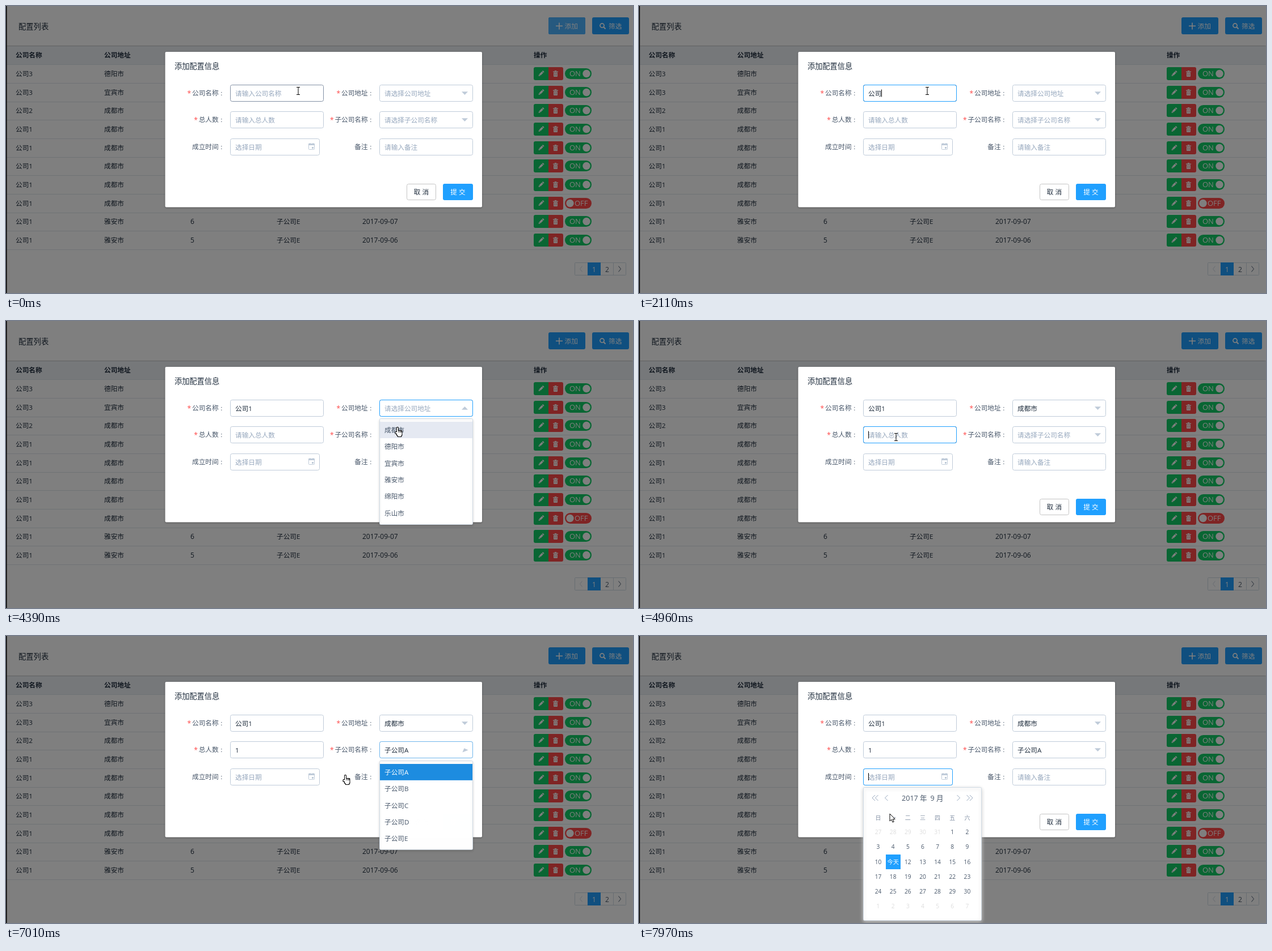
An HTML page with a canvas that plays this animation: 1105 px wide and 507 px high, repeating every 8 s.

```html
<!DOCTYPE html>
<html lang="zh-CN">
<head>
<meta charset="utf-8">
<title>配置列表</title>
<style>
html, body { margin: 0; width: 100%; height: 100%; overflow: hidden; background: #808080; }
canvas { display: block; width: 1105px; height: 507px; }
</style>
</head>
<body>
<canvas id="stage" width="1105" height="507"></canvas>
<script>
const c = document.getElementById('stage').getContext('2d');
const FONT = '"Open Sans", "Noto Sans CJK SC", "Noto Sans CJK", sans-serif';
const BLUE = '#20a0ff', GREEN = '#13ce66', RED = '#ff4949';
const INK = '#1f2d3d', LABEL = '#48576a', HINT = '#97a8be', LINE = '#bfcbd9', HOVER = '#8391a5';
const LOOP = 8000, EM = 11.65;

const ramp = (t, start, len = 200) => Math.max(0, Math.min(1, (t - start) / len));
const pulse = (t, on, off, len = 200) => ramp(t, on, len) - ramp(t, off, len);
const within = (t, a, b) => t >= a && t < b;
const smooth = k => k * k * (3 - 2 * k);

// Pointer moves; bow bends the path downwards.
const MOVES = [
  { from: 120, to: 390, x: 508, y: 150, kind: 'beam' },
  { from: 3080, to: 3660, x: 698, y: 178, kind: 'hand', bow: -40 },
  { from: 4080, to: 4370, x: 692, y: 196, kind: 'hand' },
  { from: 4520, to: 4960, x: 453, y: 205, kind: 'beam' },
  { from: 5450, to: 6200, x: 717, y: 217, kind: 'hand', bow: 20 },
  { from: 6350, to: 6700, x: 712, y: 242, kind: 'hand' },
  { from: 6810, to: 7250, x: 455, y: 249, kind: 'beam', bow: 9 },
  { from: 7500, to: 7960, x: 446, y: 321, kind: 'arrow' }
];

function pointerAt(t) {
  const p = { x: 515, y: 150, kind: 'beam' };
  for (const m of MOVES) {
    const k = smooth(ramp(t, m.from, m.to - m.from));
    p.x += (m.x - p.x) * k;
    p.y += (m.y - p.y) * k + (m.bow || 0) * Math.sin(Math.PI * k);
    if (k > 0.5) p.kind = m.kind;
  }
  return p;
}

function typedName(t) {
  if (t >= 2110) return t < 2670 ? '公司' : '公司1';
  return "gong'si".slice(0, Math.ceil(7 * ramp(t, 1310, 660)));
}

function rect(x, y, w, h, fill) {
  c.fillStyle = fill;
  c.fillRect(x, y, w, h);
}

function box(x, y, w, h, r, fill, stroke) {
  c.beginPath();
  c.roundRect(x, y, w, h, r);
  if (fill) { c.fillStyle = fill; c.fill(); }
  if (stroke) { c.strokeStyle = stroke; c.lineWidth = 1; c.stroke(); }
}

function line(color, width, ...pts) {
  c.beginPath();
  pts.forEach(p => c.lineTo(...p));
  c.strokeStyle = color;
  c.lineWidth = width;
  c.stroke();
}

function poly(fill, ...pts) {
  c.beginPath();
  pts.forEach(p => c.lineTo(...p));
  c.closePath();
  c.fillStyle = fill;
  c.fill();
}

function disc(x, y, r, fill) {
  c.beginPath();
  c.arc(x, y, r, 0, 7);
  c.fillStyle = fill;
  c.fill();
}

// y is the visual middle of the line
function text(s, x, y, color = INK, size = EM, align = 'left', weight = 400) {
  c.font = `${weight} ${size}px ${FONT}`;
  c.textAlign = align;
  c.fillStyle = color;
  c.fillText(s, x, y + size * 0.37);
}

function scoped(draw) {
  c.save();
  draw();
  c.restore();
}

function shadow(color, blur, dy, draw) {
  scoped(() => {
    c.shadowColor = color;
    c.shadowBlur = blur;
    c.shadowOffsetY = dy;
    draw();
  });
}

function chevron(x, y, dir, color, w = 4) {
  line(color, 1, [x - dir * w / 2, y - 5], [x + dir * w / 2, y], [x - dir * w / 2, y + 5]);
}

function pencil(x, y) {
  scoped(() => {
    c.translate(x, y);
    c.rotate(Math.PI / 4);
    rect(-1.7, -6.2, 3.4, 2, '#fff');
    rect(-1.7, -3.5, 3.4, 6.5, '#fff');
    poly('#fff', [-1.7, 3.5], [1.7, 3.5], [0, 6.3]);
  });
}

function trash(x, y) {
  rect(x - 4.5, y - 4, 9, 1.4, '#fff');
  rect(x - 1.7, y - 5.5, 3.4, 1.5, '#fff');
  box(x - 3.5, y - 2, 7, 7.5, 1, '#fff');
  for (const d of [-1.5, 1.5]) rect(x + d - 0.3, y - 0.5, 0.7, 4.5, RED);
}

function toggle(y, on) {
  box(985, y - 9.5, 47, 19, 9.5, on ? GREEN : RED);
  disc(on ? 1023 : 994, y, 6.7, '#fff');
  text(on ? 'ON' : 'OFF', on ? 993 : 1002, y, '#fff', 13);
}

function toolbar(t) {
  shadow('rgba(0,0,0,.4)', 4, 1, () => rect(0, -5, 1105, 75, '#fff'));
  text('配置列表', 22, 36, INK, 13.3);
  box(956, 20, 65, 30, 3, BLUE);
  c.globalAlpha = 1 - ramp(t, 0, 380);
  box(956, 20, 65, 30, 3, '#4db3ff');
  c.globalAlpha = 1;
  rect(969, 34.5, 12, 1.6, '#fff');
  rect(974.2, 29.5, 1.6, 12, '#fff');
  text('添加', 984.5, 35.5, '#fff');
  box(1033, 20, 65, 30, 3, BLUE);
  disc(1050.5, 34.5, 4.4, '#fff');
  disc(1050.5, 34.5, 2.7, BLUE);
  line('#fff', 2, [1053, 37], [1056.5, 40.5]);
  text('筛选', 1062, 35.5, '#fff');
}

function table() {
  rect(0, 71, 1105, 32, '#eef1f6');
  rect(0, 103, 1105, 1, '#dfe6ec');
  const head = (s, x) => text(s, x, 87, INK, EM, 'left', 700);
  head('公司名称', 17);
  head('公司地址', 173);
  head('操作', 930);

  for (let i = 0; i < 10; i++) {
    const y = Math.floor(119.3 + i * 32.7) + 0.5;
    rect(0, y + 16.5, 1105, 1, '#dfe6ec');
    text('公司' + Math.max(1, 3 - (i >> 1) - (i > 2)) .toString().replace(/^2$/, i === 2 ? '2' : '1'), 17, y);
    text(i > 7 ? '雅安市' : i > 1 ? '成都市' : i ? '宜宾市' : '德阳市', 173, y);
    if (i > 7) {
      text(14 - i, 325, y, INK, 12);
      text('子公司E', 477, y);
      text('2017-09-0' + (15 - i), 628, y, INK, 12);
    }
    box(930, y - 11.5, 26, 23, [3, 0, 0, 3], GREEN);
    box(956, y - 11.5, 26, 23, [0, 3, 3, 0], RED);
    pencil(943, y);
    trash(968.5, y);
    toggle(y, i !== 7);
  }
}

function pager() {
  box(1002.5, 453.5, 90, 22, 1, '#fff', '#d1dbe5');
  rect(1025, 453, 23, 23, BLUE);
  rect(1070, 453, 1, 23, '#d1dbe5');
  chevron(1013.5, 464.5, -1, '#d1dbe5');
  chevron(1081.5, 464.5, 1, LABEL);
  text(1, 1036.5, 465.5, '#fff', 12, 'center');
  text(2, 1059.5, 465.5, LABEL, 12, 'center');
}

function page(t) {
  rect(0, 0, 1105, 507, '#fff');
  toolbar(t);
  table();
  pager();
  rect(0, 0, 1105, 507, 'rgba(0,0,0,.5)');
  rect(0, 0, 1.5, 507, '#000');
}

function label(s, right, y, required) {
  const x = right - (s.length + 1) * EM;
  text(s, x, y, LABEL);
  text(':', right - 6.5, y, LABEL, EM, 'center');
  if (required) text('*', x - 8.5, y + 1, RED, 12);
}

// focus blends the blue border in; the pointer's tip darkens the grey one
function field(x, y, w, value, hint, focus, tip) {
  const over = tip && Math.abs(tip.y - y) < 15 && tip.x > x && tip.x < x + w;
  box(x + 0.5, y - 14.5, w - 1, 29, 3, '#fff', over ? HOVER : LINE);
  c.globalAlpha = focus;
  box(x + 0.5, y - 14.5, w - 1, 29, 3, null, BLUE);
  c.globalAlpha = 1;
  text(value || hint, x + 9, y + 0.3, value ? INK : HINT);
}

function caret(x, y) {
  rect(Math.round(x), y - 6.5, 1, 13, '#000');
}

function select(y, value, hint, open, focus, tip) {
  field(658, y, 165, value, hint, focus, tip);
  scoped(() => {
    c.translate(808.5, y);
    c.rotate(open * Math.PI);
    poly(LINE, [-5.5, -2.8], [5.5, -2.8], [0, 3]);
  });
}

function dateIcon(x, y) {
  box(x + 0.5, y + 1.5, 10, 10, 1, null, LINE);
  rect(x, y + 1, 11, 3, LINE);
  for (const d of [2, 7.5]) rect(x + d, y, 1.5, 2, LINE);
  rect(x + 6, y + 7, 3, 3, LINE);
}

function form(t, pointer) {
  const tip = { x: pointer.x, y: pointer.y - (pointer.kind === 'hand' ? 8 : 0) };
  shadow('rgba(0,0,0,.35)', 3, 1, () => box(280.5, 81, 558.5, 274.5, 2, '#fff'));
  text('添加配置信息', 297, 106.5, INK, 13.2, 'left', 500);

  label('公司名称', 386.3, 154, true);
  label('总人数', 386.3, 201, true);
  label('成立时间', 386.3, 249);
  label('公司地址', 649.3, 154, true);
  label('子公司名称', 649.3, 201, true);
  label('备注', 649.3, 249);

  const name = typedName(t);
  field(395, 154, 165, name, '请输入公司名称', pulse(t, 120, 3720), tip);
  const end = 404 + (name ? c.measureText(name).width : 0);
  if (within(t, 1320, 2110)) rect(404, 160, end - 404, 1, INK);
  if (within(t, 120, 790) || within(t, 1320, 2670) || within(t, 2820, 3220)) caret(end, 154);

  const count = t >= 5410 ? '1' : '';
  field(395, 201, 165, count, '请输入总人数', pulse(t, 4750, 5950), tip);
  if (within(t, 4960, 5880)) caret(count ? 411 : 404, 201);

  field(395, 249, 158, '', '选择日期', ramp(t, 7300), tip);
  if (t >= 7410) caret(404, 248.5);
  dateIcon(533, 242);

  select(154, t >= 4515 ? '成都市' : '', '请选择公司地址', pulse(t, 3650, 4460, 300), pulse(t, 3550, 4600), tip);
  select(201, t >= 6810 ? '子公司A' : '', '请选择子公司名称', pulse(t, 6260, 6980, 260), pulse(t, 6250, 6910), tip);
  field(658, 249, 165, '', '请输入备注', 0, tip);

  box(706.5, 314.5, 51, 28, 3, '#fff', '#c4c4c4');
  text('取 消', 732, 329, INK, EM, 'center');
  box(770, 314, 53, 29, 3, BLUE);
  text('提 交', 796.5, 329, '#fff', EM, 'center');
}

// Popups unfold from their top edge while fading in.
function unfold(k, y, draw) {
  if (k <= 0) return;
  scoped(() => {
    c.globalAlpha = k;
    c.translate(0, y);
    c.scale(1, k);
    c.translate(0, -y);
    draw();
  });
}

function menu(y, items, k, hovered, chosen) {
  unfold(k, y, () => {
    shadow('rgba(0,0,0,.15)', 4, 2, () =>
      box(658.5, y + 0.5, 164, 10 + items.length * 29.5, 2, '#fff', '#d1dbe5'));
    items.forEach((s, i) => {
      const top = Math.round(y + 5.7 + i * 29.4), lit = i === 0 && (hovered || chosen);
      if (lit) rect(659, top, 163, 29, chosen ? '#1d8ce0' : '#e5e9f2');
      text(s, 667, top + 15, lit && chosen ? '#fff' : LABEL);
    });
  });
}

function calendar(k) {
  unfold(k, 267, () => {
    shadow('#ccc', 6, 2, () => box(395.5, 267.5, 208, 235, 2, '#fff', '#d1dbe5'));
    for (const dir of [-1, 1]) {
      for (const d of [63.5, 80.5, 86]) chevron(499.5 + dir * d, 286, dir, HINT, 5);
    }
    text('2017 年', 463, 286.5, LABEL, 12.6);
    text('9 月', 513.5, 286.5, LABEL, 12.6);
    const colX = i => 421.5 + 26.15 * (i % 7);
    [...'日一二三四五六'].forEach((s, i) => text(s, colX(i), 321, HOVER, 10, 'center'));
    for (let i = 0; i < 42; i++) {
      const day = i - 4, x = colX(i), y = 346.5 + 26.15 * Math.floor(i / 7);
      const today = day === 11, inside = day > 0 && day < 31;
      if (today) rect(Math.round(x - 12.9), Math.round(y - 13), 26, 26, BLUE);
      text(today ? '今天' : inside ? day : day < 1 ? day + 31 : day - 30, x, y,
        today ? '#fff' : inside ? LABEL : '#ddd', 10.2, 'center');
    }
  });
}

function candidates(t) {
  if (!within(t, 1320, 2110)) return;
  const wide = t >= 1840, w = wide ? 302 : 289;
  box(409.5, 170.5, w, 36, 2, '#fff', '#c8d0da');
  rect(410, 187, w - 1, 1, '#e5e9f2');
  text(typedName(t), 417, 179, LABEL, 11);
  (wide ? ['公司', '公式', '攻势', '公私', '工'] : [...'个公工共供'])
    .forEach((s, i) => text(`${i + 1}.${s}`, 417 + i * 54, 197, i ? LABEL : BLUE, 12));
}

const POINTERS = {
  beam() {
    rect(-0.5, -6, 1, 13, '#000');
    for (const y of [-7, 6]) rect(-3, y, 6, 1, '#000');
  },
  hand() {
    // black silhouette, then the same parts inset in white
    [['#000', 0], ['#fff', 1]].forEach(([color, d]) => {
      const part = (x, y, w, h) => box(x + d, y + d, w - 2 * d, h - 2 * d, 1.5, color);
      part(-4, -9, 4, 14);
      part(-4, -3, 10.5, 10);
      part(-6.5, -1, 4.5, 5);
      part(-2.5, 2, 8, 7);
    });
    for (const x of [-0.5, 2, 4]) rect(x, -2, 0.9, 3, '#000');
  },
  arrow() {
    c.beginPath();
    for (const p of [[-4, -7], [-4, 6], [-1, 3.3], [1, 8], [3.2, 7], [1.2, 2.6], [5.2, 2.4]]) c.lineTo(...p);
    c.closePath();
    c.fillStyle = '#fff';
    c.fill();
    c.strokeStyle = '#000';
    c.lineWidth = 1;
    c.stroke();
  }
};

function render(t) {
  const pointer = pointerAt(t);
  page(t);
  form(t, pointer);
  candidates(t);
  menu(172, ['成都市', '德阳市', '宜宾市', '雅安市', '绵阳市', '乐山市'],
    pulse(t, 3800, 4515, 290), t >= 4200, t >= 4515);
  menu(220, [...'ABCDE'].map(s => '子公司' + s), pulse(t, 6350, 7010, 250), t >= 6600, t >= 6810);
  calendar(ramp(t, 7410, 280));
  scoped(() => {
    c.translate(Math.round(pointer.x), Math.round(pointer.y));
    POINTERS[pointer.kind]();
  });
}

const start = performance.now();
function loop() {
  render((performance.now() - start) % LOOP);
  requestAnimationFrame(loop);
}
loop();
</script>
</body>
</html>
```
